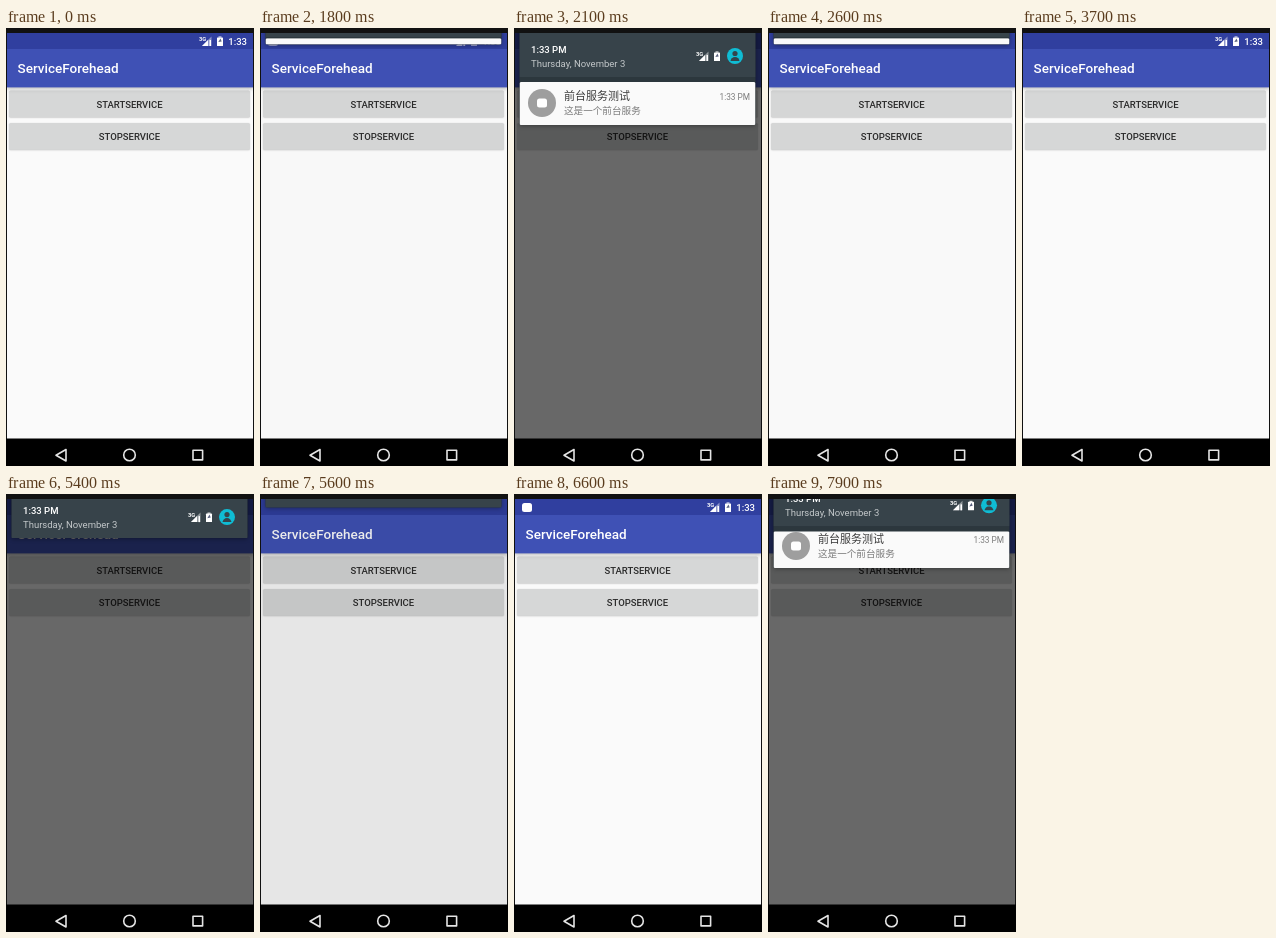
An HTML page with a canvas that plays this animation: 248 px wide and 438 px high, repeating every 8 s.

```html
<!DOCTYPE html>
<html lang="zh-CN">
<head>
<meta charset="utf-8">
<title>Foreground service</title>
<style>
html, body { margin: 0; width: 248px; height: 438px; overflow: hidden; background: #000; }
canvas { display: block; }
</style>
</head>
<body>
<canvas id="stage" width="248" height="438"></canvas>
<script>
const ctx = document.getElementById('stage').getContext('2d');
const LOOP = 8000;
const TICK = 100;
const SANS = 'Roboto, "Noto Sans CJK SC", "Noto Sans CJK", sans-serif';
const PANEL_X = 5.5, PANEL_W = 236;

const drag = u => (1 - Math.cos(Math.PI * u)) / 2;
const fling = u => 1 - (1 - u) ** 1.6;
const settle = u => 1 - (1 - u) ** 3;

const swipes = [
  { ease: drag, down: 1710, open: 2100, up: 2400, shut: 2800 },
  { ease: fling, down: 4600, open: 5100, up: 5380, shut: 5900 },
  { ease: drag, down: 7700, open: 8000, up: 8000, shut: 8400 }
];
const startPresses = [{ from: 600, to: 1000 }, { from: 6000, to: 6500 }];
const stopPresses = [{ from: 2900, to: 3600 }];

const progress = (t, from, to) => Math.min(1, Math.max(0, (t - from) / (to - from)));
const serviceOn = t => (t >= 900 && t < 3300) || t >= 6300;

function pullAt(t) {
  const s = swipes.find(s => t >= s.down && t < s.shut);
  if (!s) return 0;
  return s.ease(progress(t, s.down, s.open)) * (1 - settle(progress(t, s.up, s.shut)));
}

function rippleAt(presses, t) {
  const p = presses.find(p => t > p.from && t < p.to);
  return p ? .13 * Math.sin(Math.PI * progress(t, p.from, p.to)) : 0;
}

function rect(x, y, w, h, color) {
  ctx.fillStyle = color;
  ctx.fillRect(x, y, w, h);
}

function rounded(x, y, w, h, r, color) {
  ctx.fillStyle = color;
  ctx.beginPath();
  ctx.roundRect(x, y, w, h, r);
  ctx.fill();
}

function disc(x, y, r, color) {
  ctx.fillStyle = color;
  ctx.beginPath();
  ctx.arc(x, y, r, 0, Math.PI * 2);
  ctx.fill();
}

function polygon(points, color) {
  ctx.fillStyle = color;
  ctx.beginPath();
  points.forEach(([x, y]) => ctx.lineTo(x, y));
  ctx.closePath();
  ctx.fill();
}

function text(str, x, y, size, color, weight = 400, align = 'left') {
  ctx.font = `${weight} ${size}px ${SANS}`;
  ctx.textAlign = align;
  ctx.fillStyle = color;
  ctx.fillText(str, x, y);
}

function withShadow(blur, dy, alpha, draw) {
  ctx.save();
  ctx.shadowColor = `rgba(0,0,0,${alpha})`;
  ctx.shadowBlur = blur;
  ctx.shadowOffsetY = dy;
  draw();
  ctx.restore();
}

function clipped(x, y, w, h, r, draw) {
  ctx.save();
  ctx.beginPath();
  ctx.roundRect(x, y, w, h, r);
  ctx.clip();
  draw();
  ctx.restore();
}

// Signal and battery, with (x, y) at the top left of the pair
function statusIcons(x, y) {
  polygon([[x + 12.5, y], [x + 12.5, y + 9.5], [x + 3, y + 9.5]], 'rgba(255,255,255,.45)');
  polygon([[x + 9, y + 3.5], [x + 9, y + 9.5], [x + 3, y + 9.5]], '#fff');
  rect(x + 10.5, y + 3.5, 1.5, 6, '#fff');
  text('3G', x, y + 4.5, 5.8, '#fff', 700);
  rounded(x + 18, y + 1, 6, 8.5, .6, '#fff');
  rect(x + 19.5, y, 3, 1, '#fff');
  polygon([[x + 21.5, y + 2], [x + 19.3, y + 5.6], [x + 22.7, y + 5]], '#5b6380');
}

function statusBar(alpha, on) {
  rect(1, 5, 246, 16, '#303f9f');
  ctx.globalAlpha = alpha;
  if (on) rounded(8, 9, 10, 9, 2.5, '#fff');
  statusIcons(193, 8.5);
  text('1:33', 241, 17, 9.5, '#fff', 500, 'right');
  ctx.globalAlpha = 1;
}

function button(label, y, press) {
  withShadow(1.5 + press * 14, .5, .2, () => rounded(3, y, 241, 26.8, 1.5, '#d6d7d7'));
  rounded(3, y, 241, 26.8, 1.5, `rgba(0,0,0,${press})`);
  text(label, 123.5, y + 17, 9.5, '#2a2a2a', 500, 'center');
}

function app(t) {
  rect(1, 21, 246, 390, '#fafafa');
  button('STARTSERVICE', 62.5, rippleAt(startPresses, t));
  button('STOPSERVICE', 95, rippleAt(stopPresses, t));
  withShadow(4, 1.5, .25, () => rect(1, 21, 246, 38.4, '#3f51b5'));
  text('ServiceForehead', 11.5, 45, 13.5, '#fff', 500);
}

function card(top, bottom) {
  clipped(PANEL_X, top, PANEL_W, bottom - top, 1.5, () => {
    rect(PANEL_X, top, PANEL_W, bottom - top, '#fafafa');
    disc(28, bottom - 22, 14, '#9e9e9e');
    rounded(23, bottom - 26.5, 10, 9, 2.5, '#fff');
    text('前台服务测试', 50, bottom - 25, 11, '#3c3c3c');
    text('这是一个前台服务', 50, bottom - 11.5, 9.6, '#7c7c7c');
    text('1:33 PM', 236, bottom - 25, 8.3, '#7c7c7c', 400, 'right');
  });
}

function header(offset) {
  rect(PANEL_X, 5, PANEL_W, 44 + offset, '#37434a');
  text('1:33 PM', 17, 25 + offset, 9.5, '#fff', 500);
  text('Thursday, November 3', 17, 39 + offset, 9.5, '#c3c8ca');
  statusIcons(182, 23.5 + offset);
  disc(221, 28 + offset, 8, '#0fbcd4');
  disc(221, 25.5 + offset, 2.6, '#34444c');
  clipped(216, 29 + offset, 10, 4, 0, () => disc(221, 33.5 + offset, 4.5, '#34444c'));
}

function shade(pull, on) {
  const dim = .58 * progress(pull, .12, .65);
  rect(1, 5, 246, 406, `rgba(0,0,0,${dim})`);
  const bottom = 5 + pull * (on ? 92 : 44);
  const offset = on ? -44 * (1 - pull) ** .7 : bottom - 49;
  clipped(1, 5, 246, 406, 0, () => {
    withShadow(4, 1, .35, () => rounded(PANEL_X, 0, PANEL_W, bottom, 1.5, '#2c373d'));
    clipped(PANEL_X, 5, PANEL_W, Math.max(0, 44 + offset), 0, () => header(offset));
    const top = 49 + offset + Math.min(5, .5 + pull * 6);
    if (on && bottom > top) card(top, bottom);
  });
}

function navigation() {
  rect(0, 410.5, 248, 28, '#000');
  ctx.strokeStyle = '#e4e4e4';
  ctx.lineWidth = 1.6;
  ctx.lineJoin = 'round';
  ctx.beginPath();
  ctx.moveTo(60, 421.5);
  ctx.lineTo(60, 433);
  ctx.lineTo(50, 427.2);
  ctx.closePath();
  ctx.stroke();
  ctx.beginPath();
  ctx.arc(123.5, 427, 5.8, 0, Math.PI * 2);
  ctx.stroke();
  ctx.strokeRect(187, 422.3, 9.6, 9.6);
}

function render(t) {
  const pull = pullAt(t);
  const opening = pullAt(t - TICK) === 0;
  const on = serviceOn(t);
  rect(0, 0, 248, 438, '#111');
  app(t);
  statusBar(pull === 0 ? 1 : opening ? .5 : 0, on);
  if (pull > 0) shade(pull, on);
  navigation();
}

const origin = performance.now();
function frame() {
  const t = (performance.now() - origin) % LOOP;
  render(Math.floor(t / TICK) * TICK);
  requestAnimationFrame(frame);
}
frame();
</script>
</body>
</html>
```
